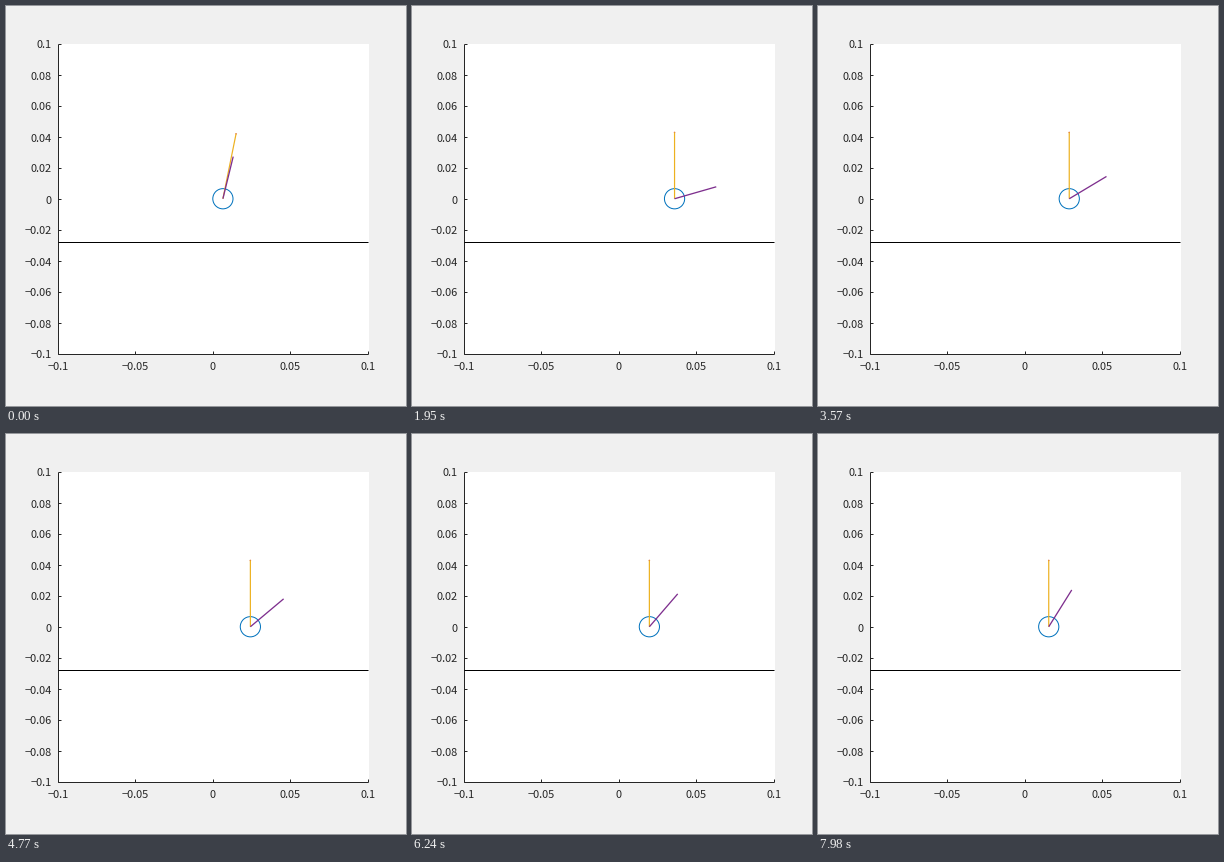
Animation of 400x400 px, one loop 8 s. Source, as a matplotlib script:

```python
import numpy as np
import matplotlib.pyplot as plt
from matplotlib.animation import FuncAnimation
from matplotlib.patches import Circle, Rectangle

SIZE, DPI = 400, 100
PX = 72 / DPI              # one pixel in points
LEFT, TOP, SIDE = 52, 38, 310
SCALE = SIDE / 0.2         # pixels per unit
CX, CY = 206.5, 192.75     # where the data origin falls
WHEEL = 0.028 * SCALE      # rolling radius
ROD = 66.3
STEP, TICK, LOOP = 30, 10, 8000
INK = "#262626"

fig = plt.figure(figsize=(SIZE / DPI, SIZE / DPI), dpi=DPI, facecolor="#f0f0f0")
ax = fig.add_axes([0, 0, 1, 1])
ax.set_xlim(0, SIZE)
ax.set_ylim(SIZE, 0)
ax.axis("off")


def line(xs, ys, color, width=1.0, **kw):
    return ax.plot(xs, ys, color=color, lw=width * PX,
                   solid_capstyle="butt", **kw)[0]


def label(x, y, value, ha):
    text = f"{value:.2f}".rstrip("0").rstrip(".").replace("-", "\u2212")
    ax.text(x, y, text, ha=ha, va="center_baseline", color=INK,
            fontsize=11 * PX, family="Noto Sans CJK JP")


# Whole coordinates snap onto the pixel that starts there.
right, bottom = LEFT + SIDE, TOP + SIDE
ax.add_patch(Rectangle((LEFT, TOP), SIDE + 1, SIDE + 1, fc="white", lw=0))
line([LEFT, LEFT], [TOP, bottom], INK)
line([LEFT, right], [bottom, bottom], INK)

for k in range(11):
    y = TOP + 31 * k
    line([LEFT, LEFT + 3], [y, y], INK)
    label(46, y + 0.5, (5 - k) / 50, "right")
for k in range(5):
    x = LEFT + 77.4 * k
    line([x, x], [bottom, bottom - 3], INK)
    label(x, 359.5, (k - 2) / 20, "center")

line([LEFT, right], [236, 236], "black")

hub = ax.add_patch(Circle((CX, CY), 10.1, fill=False, ec="#0072BD", lw=PX))
tip = ax.add_patch(Circle((CX, CY), 0.5, fill=False, ec="#D95319", lw=0.5 * PX))
rod = line([], [], "#EDB120", 1.2, snap=False)
spoke = line([], [], "#7E2F8E", 1.3, snap=False)


def pose(t):
    """Wheel travel in pixels and body lean in radians after t seconds."""
    fast, mid = np.exp(-14 * t), np.exp(-6 * t)
    travel = 73.5 * np.exp(-0.139 * t) - 48 * mid - 15.1 * fast
    lean = 0.507 * fast - 0.307 * mid
    return travel, lean


def arm(artist, x, angle, length):
    end = x + length * np.sin(angle), CY - length * np.cos(angle)
    artist.set_data([x, end[0]], [CY, end[1]])
    return end


def draw(i):
    travel, lean = pose(i * TICK // STEP * STEP / 1000)
    x = CX + travel
    hub.center = x, CY
    tip.center = arm(rod, x, lean, ROD)
    arm(spoke, x, travel / WHEEL, WHEEL)
    return hub, tip, rod, spoke


anim = FuncAnimation(fig, draw, frames=LOOP // TICK, interval=TICK,
                     repeat=True, repeat_delay=0, blit=False)
plt.show()
```
